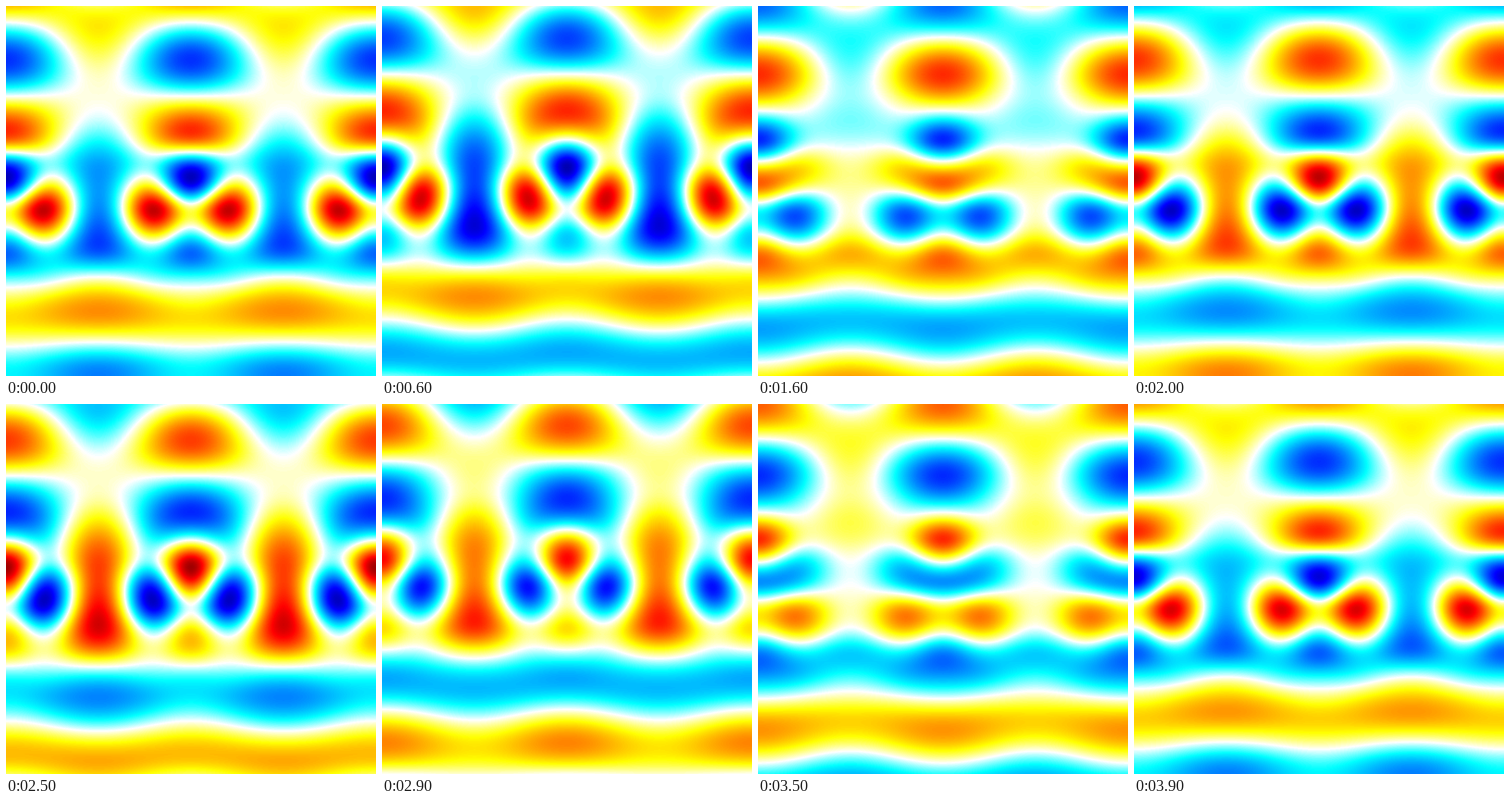
Recreate the animation shown at these times as a matplotlib script. Size 400 by 400 pixels, loop 4 s.

```python
import numpy as np
import matplotlib.pyplot as plt
from matplotlib.animation import FuncAnimation
from matplotlib.colors import LinearSegmentedColormap

SIZE = 400
PERIOD = 200              # lateral period of the field, px
STEP = 24                 # spacing of the vertical knots, px
FRAMES = 40
ORIGIN = 3 - 2 * STEP     # first knot, above the stage
NEAR = slice(7, 14)       # knots inside the scattering layer

# Key phasors down the layer, on the lines x = 200, 100 and 150
CENTRE = [.58 + .33j, .48 - .47j, -.62 - .64j, -.74 - .10j,
          .14 - .12j, -.10 - .30j, -.55 + .11j]
EDGE = [-.05 - .30j, -.25 - .44j, -.44 - .44j, -.45 - .45j,
        -.48 - .58j, -.60 - .57j, -.57 - .10j]
QUARTER = [.24 + .19j, .16 + .05j, -.12 + .30j, .27 + .63j,
           .77 + .23j, .33 - .18j, -.24 + .06j]


def wave(amp, degrees):
    return amp * np.exp(1j * np.radians(degrees))


def far_orders(y):
    """Orders 0 and 1: transmitted above, incident and reflected below."""
    above = y < SIZE / 2
    order0 = np.where(above, wave(.27, -(10 + 2.7 * y)),
                      wave(.39, -2.7 * (y - 332)))
    order1 = np.where(above, wave(.40, -(76 + 1.97 * y)),
                      wave(.12, 2 * (y - 310) + 180))
    return order0, order1


def spline(values, pos):
    """Cubic spline through evenly spaced values."""
    n = len(values)
    system = 4 * np.eye(n) + np.eye(n, k=1) + np.eye(n, k=-1)
    slope = np.linalg.solve(system, 6 * np.gradient(values))
    i = np.floor(pos).astype(int)
    u = pos - i
    return ((1 + 2 * u) * (1 - u) ** 2 * values[i]
            + u * (1 - u) ** 2 * slope[i]
            + u ** 2 * (3 - 2 * u) * values[i + 1]
            + u ** 2 * (u - 1) * slope[i + 1])


def build_field():
    knots = ORIGIN + STEP * np.arange(21)
    order0, order1 = far_orders(knots)
    lines = [order0 + order1, order0 - order1, order0.copy()]
    for line, layer in zip(lines, (CENTRE, EDGE, QUARTER)):
        line[NEAR] = layer

    pixels = np.arange(SIZE) + .5
    centre, edge, quarter = (spline(line, (pixels - ORIGIN) / STEP)
                             for line in lines)
    mean = (centre + edge) / 4
    order2 = mean - quarter / 2
    order3 = .16 * order2
    orders = (mean + quarter / 2, (centre - edge) / 2 - order3, order2, order3)

    phase = 2 * np.pi * pixels / PERIOD
    return sum(np.outer(u, np.cos(m * phase)) for m, u in enumerate(orders))


field = build_field()


def snapshot(frame):
    return (field * np.exp(-2j * np.pi * frame / FRAMES)).real


cmap = LinearSegmentedColormap.from_list("white_jet", [
    (0, (0, 0, .5)), (.125, (0, 0, 1)), (.375, (0, 1, 1)), (.5, (1, 1, 1)),
    (.625, (1, 1, 0)), (.875, (1, 0, 0)), (1, (.5, 0, 0))])

fig = plt.figure(figsize=(4, 4), dpi=100)
ax = fig.add_axes([0, 0, 1, 1])
ax.axis("off")
image = ax.imshow(snapshot(0), cmap=cmap, vmin=-1, vmax=1,
                  interpolation="nearest", aspect="auto")


def update(frame):
    image.set_data(snapshot(frame))
    return [image]


anim = FuncAnimation(fig, update, frames=FRAMES, interval=100, repeat=True)
plt.show()
```
